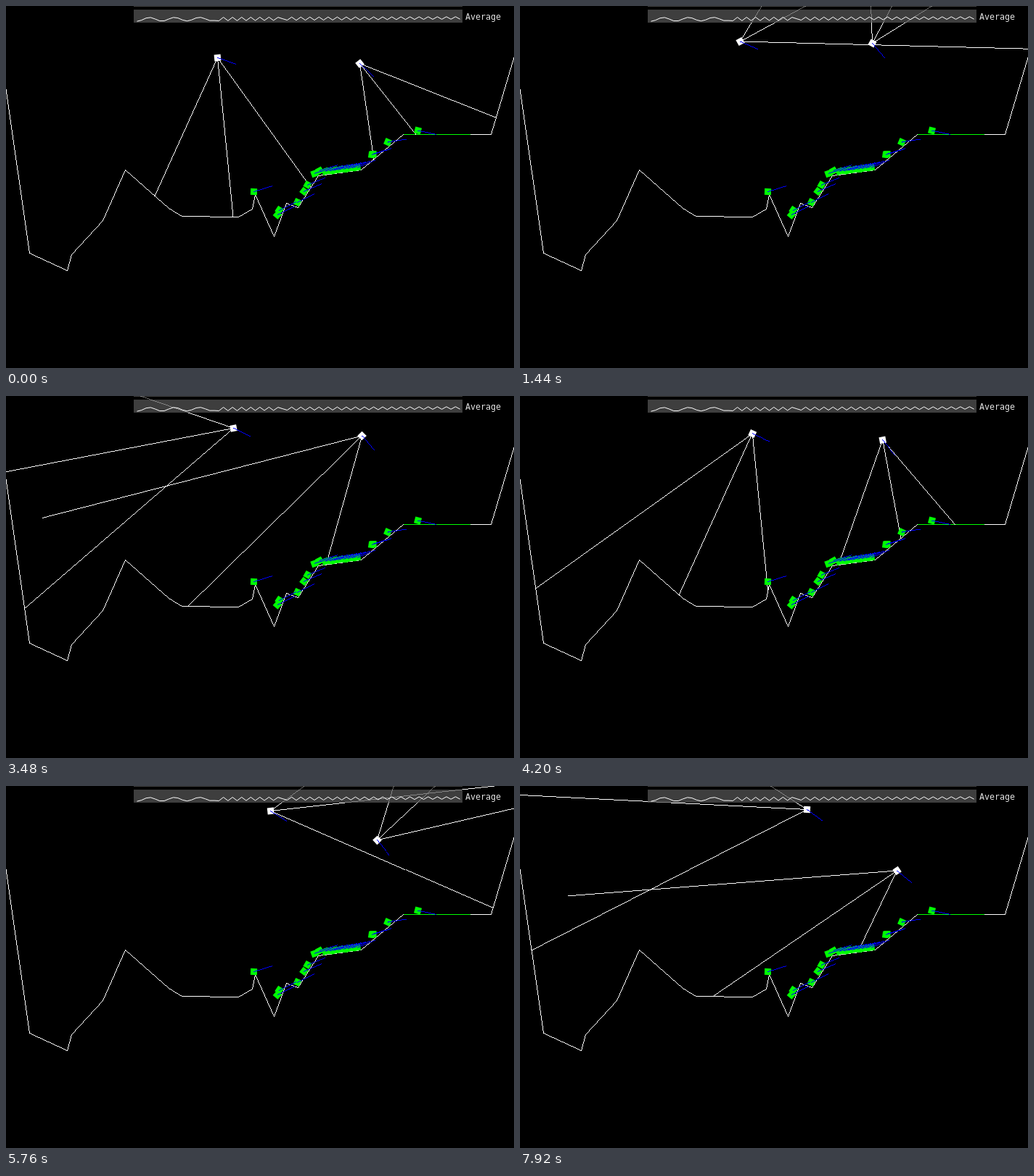
Write an HTML page with a canvas that moves like this. It is 700 px wide and 500 px high and loops after 8000 ms.

```html
<!DOCTYPE html>
<html lang="en">
<head>
<meta charset="utf-8">
<title>Ray sensors</title>
<style>
html, body { margin: 0; width: 100%; height: 100%; overflow: hidden; background: #000; }
canvas { display: block; }
</style>
</head>
<body>
<canvas id="stage" width="700" height="500"></canvas>
<script>
const ctx = document.getElementById('stage').getContext('2d');
const STEP = 120, LOOP = 8000, REACH = 454, ARROW = 26, SIZE = 9, SPIN = -9.55;
const RAD = Math.PI / 180;
const goal = { x: 594, y: 177.5, half: 46 };

// Corners of the terrain, at pixel centres
const ground = [
  [-32, -105], [0, 118], [32, 341], [84, 365], [90, 343], [133, 296],
  [164, 226], [224, 279], [242, 290], [320, 291], [339, 280], [343, 260],
  [369, 318], [386, 272], [402, 278], [430, 234], [489, 226], [547, 177],
  [668, 177], [700, 69], [732, -41]
].map(([x, y]) => [x + 0.5, y + 0.5]);

// Way points are [step, x, y]; turn is the spin lost to thrust, in degrees
const flyers = [
  {
    heading: 84.4, turn: 8.8,
    path: [[0, 291.5, 71.5], [12, 303.5, 49], [20, 308, 42], [29, 313.5, 44.5],
      [36, 323, 52], [41, 346, 44.5], [57, 378.5, 27.5], [66, 395.5, 32.5]]
  },
  {
    heading: 51.7, turn: 4.2,
    path: [[0, 487.5, 79.5], [12, 485.5, 51.5], [20, 483, 44.5], [29, 490.5, 55],
      [41, 508.5, 67], [57, 513, 90], [66, 519.5, 117]]
  }
];

// Resting agents, spread evenly from one end of a row to the other
const resting = [
  row(2, 15, [567.5, 172], [526, 188]),
  row(2, 0, [506, 204.5], [504, 205.5]),
  row(8, -8, [484, 223], [440, 228.5]),
  row(2, -28, [432, 227.5], [425, 231.5]),
  row(2, 29, [415.5, 247], [410.5, 256]),
  row(1, 25, [401.5, 271]),
  row(2, 33, [376.5, 282], [374, 288.5]),
  row(1, 2, [341.5, 256.5])
].flat();

function row(count, tilt, from, to = from) {
  return Array.from({ length: count }, (_, i) => {
    const u = count > 1 ? i / (count - 1) : 0;
    return {
      x: from[0] + (to[0] - from[0]) * u,
      y: from[1] + (to[1] - from[1]) * u,
      angle: (tilt + 12 * Math.sin(i * 2.4)) * RAD
    };
  });
}

function ease(from, to, n) {
  const u = Math.min(1, Math.max(0, (n - from) / (to - from)));
  return u * u * (3 - 2 * u);
}

// Smooth curve through unevenly spaced way points
function along(path, n, col) {
  const last = path.length - 1;
  const span = i => path[i + 1][0] - path[i][0];
  const slope = i => (path[i + 1][col] - path[i][col]) / span(i);
  const tangent = i => {
    if (i === 0) return 2 * slope(0) - tangent(1);
    if (i === last) return 2 * slope(last - 1) - tangent(last - 1);
    return (slope(i - 1) * span(i) + slope(i) * span(i - 1)) / (span(i - 1) + span(i));
  };
  let i = 0;
  while (i < last - 1 && n >= path[i + 1][0]) i++;
  const h = span(i), u = (n - path[i][0]) / h, v = 1 - u;
  return v * v * (1 + 2 * u) * path[i][col] + u * u * (3 - 2 * u) * path[i + 1][col]
    + h * u * v * (v * tangent(i) - u * tangent(i + 1));
}

function pose({ path, heading, turn }, n) {
  const lost = 0.19 * ease(0, 12, n) + 0.58 * ease(29, 41, n) + 0.23 * ease(41, 57, n);
  return {
    x: along(path, n, 1),
    y: along(path, n, 2),
    angle: (heading + SPIN * n + turn * lost) * RAD
  };
}

// Hard-edged line, one pixel wide
function line(x0, y0, x1, y1, color) {
  ctx.fillStyle = color;
  const dx = x1 - x0, dy = y1 - y0;
  const count = Math.max(1, Math.round(Math.max(Math.abs(dx), Math.abs(dy))));
  for (let i = 0; i <= count; i++) {
    ctx.fillRect(Math.floor(x0 + dx * i / count), Math.floor(y0 + dy * i / count), 1, 1);
  }
}

function castRay(x, y, angle) {
  const cx = Math.cos(angle), cy = Math.sin(angle);
  let dist = REACH;
  for (let i = 1; i < ground.length; i++) {
    const [ax, ay] = ground[i - 1], [bx, by] = ground[i];
    const ex = bx - ax, ey = by - ay;
    const det = cx * ey - cy * ex;
    if (Math.abs(det) < 1e-9) continue;
    const d = ((ax - x) * ey - (ay - y) * ex) / det;
    const s = ((ax - x) * cy - (ay - y) * cx) / det;
    if (d > 0 && s >= 0 && s <= 1) dist = Math.min(dist, d);
  }
  line(x, y, x + cx * dist, y + cy * dist, '#fff');
}

function body({ x, y, angle }, color) {
  ctx.save();
  ctx.translate(x, y);
  ctx.rotate(angle);
  ctx.fillStyle = color;
  ctx.fillRect(-SIZE / 2, -SIZE / 2, SIZE, SIZE);
  ctx.restore();
}

function arrow({ x, y }) {
  const aim = Math.atan2(goal.y - y, goal.x - x);
  line(x, y, x + ARROW * Math.cos(aim), y + ARROW * Math.sin(aim), '#00f');
}

// Slow waves that turn into a zigzag and settle
function average(i) {
  const slow = 2 * Math.PI * i / 5.5;
  const fast = Math.PI * (i - ease(30, 34, i));
  return 18 - i / 35 + (2.7 - i / 70) * Math.cos(i < 18 ? slow : fast);
}

function panel() {
  ctx.fillStyle = 'rgba(0,0,0,.6)';
  ctx.fillRect(176, 0, 453, 23);
  ctx.fillStyle = 'rgba(204,204,204,.3)';
  ctx.fillRect(176, 0, 453, 1);
  ctx.fillRect(176, 5, 453, 18);
  ctx.strokeStyle = '#fff';
  ctx.lineWidth = 1;
  ctx.beginPath();
  for (let i = 0; i < 72; i++) ctx.lineTo(180.5 + i * 6.27, average(i) + 0.5);
  ctx.stroke();
  ctx.fillStyle = '#e6e6e6';
  ctx.font = '11.63px "DejaVu Sans Mono", monospace';
  ctx.fillText('Average', 633, 19);
}

function draw(n) {
  ctx.fillStyle = '#000';
  ctx.fillRect(0, 0, 700, 500);
  for (let i = 1; i < ground.length; i++) line(...ground[i - 1], ...ground[i], '#fff');
  line(goal.x - goal.half, goal.y, goal.x + goal.half - 1, goal.y, '#0f0');

  const poses = flyers.map(flyer => pose(flyer, n));
  for (const { x, y, angle } of poses) {
    for (const spread of [-30, 0, 30]) castRay(x, y, angle + spread * RAD);
  }
  resting.forEach(agent => body(agent, '#0f0'));
  poses.forEach(agent => body(agent, '#fff'));
  [...resting, ...poses].forEach(arrow);
  panel();
}

const start = performance.now();
let shown = -1;
function tick() {
  const n = Math.floor(((performance.now() - start) % LOOP) / STEP);
  if (n !== shown) draw(shown = n);
  requestAnimationFrame(tick);
}
tick();
</script>
</body>
</html>
```
